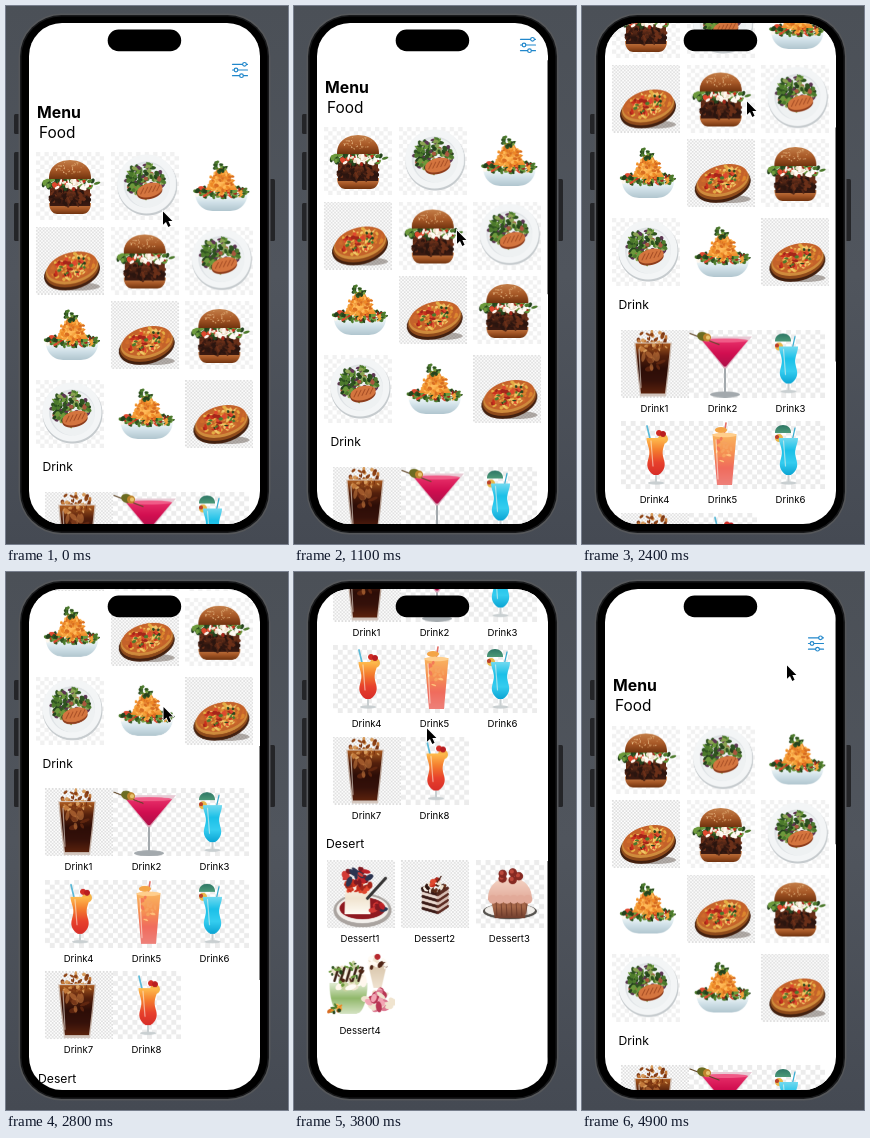
Animation of 282 by 538 pixels, one loop 5 s. Source, as an HTML page with a canvas:

```html
<!DOCTYPE html>
<html lang="en">
<head>
<meta charset="utf-8">
<title>Menu</title>
<style>
html, body { margin: 0; width: 100%; height: 100%; overflow: hidden; background: #4a4f57; }
canvas { display: block; width: 282px; height: 538px; }
</style>
</head>
<body>
<canvas id="stage"></canvas>
<script>
const W = 282, H = 538, LOOP = 5000, STEP = 100, TILE = 68, DETAIL = 2;
const stage = document.getElementById('stage');
const dpr = window.devicePixelRatio || 1;
stage.width = W * dpr;
stage.height = H * dpr;
const screenCtx = stage.getContext('2d');
let g = screenCtx;

// ---- drawing helpers ----
function line(color, width, x0, y0, x1, y1) {
  g.strokeStyle = color; g.lineWidth = width; g.lineCap = 'round';
  g.beginPath(); g.moveTo(x0, y0); g.lineTo(x1, y1); g.stroke();
}
function oval(color, x, y, rx, ry = rx, turn = 0) {
  g.fillStyle = color; g.beginPath(); g.ellipse(x, y, rx, ry, turn, 0, 7); g.fill();
}
function box(color, x, y, w, h, r = 0) {
  g.fillStyle = color; g.beginPath(); g.roundRect(x, y, w, h, r); g.fill();
}
function fade(y0, y1, colors) {
  const grad = g.createLinearGradient(0, y0, 0, y1);
  colors.forEach((c, i) => grad.addColorStop(i / Math.max(1, colors.length - 1), c));
  return grad;
}

// A solid turned on a lathe: half(u) is its half width, u runs from top to bottom.
function turned(colors, x, y0, y1, half) {
  const n = 24;
  g.fillStyle = fade(y0, y1, colors);
  g.beginPath();
  for (let i = 0; i <= 2 * n + 1; i++) {
    const right = i <= n, u = (right ? i : 2 * n + 1 - i) / n;
    g.lineTo(x + (right ? 1 : -1) * half(u), y0 + (y1 - y0) * u);
  }
  g.fill();
}
const taper = (top, bottom) => u => top + (bottom - top) * u;
const dome = w => u => w * Math.sqrt(1 - (1 - u) ** 2.4);
const cup = (w, foot) => u => foot + (w - foot) * Math.sqrt(1 - u * u);
const tulip = w => u => w * (0.85 + 0.15 * Math.cos(u * 8)) * Math.sqrt(1 - 0.92 * u ** 6);

let seed = 1;
const random = () => (seed = (seed * 16807) % 2147483647) / 2147483647;
function scatter(n, x, y, rx, ry, size, colors) {
  for (let i = 0; i < n; i++) {
    const a = random() * 6.28, d = Math.sqrt(random());
    oval(colors[Math.floor(random() * colors.length)], x + Math.cos(a) * d * rx, y + Math.sin(a) * d * ry,
      size * (0.6 + random() * 0.6), size * (0.3 + random() * 0.5), random() * 3);
  }
}
function checks(size, color) {
  g.fillStyle = color;
  for (let y = 0; y * size < TILE; y++)
    for (let x = y % 2; x * size < TILE; x += 2) g.fillRect(x * size, y * size, size, size);
}
const coarse = () => checks(4.86, '#ececec');
const medium = () => checks(4.25, '#f1f1f1');
const fine = () => checks(1.7, '#dedede');

// ---- pictures, each in a 68 x 68 tile ----
const GREEN = ['#2f5420', '#4c7a2c', '#24421c', '#6d9a3c'];
const RED = ['#c92f1d', '#a5251a', '#df482e'];
const AMBER = ['#c1783a', '#8f4416', '#d69b5c', '#7b3512'];
const CARROT = ['#f5a13b', '#d76c21', '#ffba58', '#ee8826'];
const CREAM = ['#fff7ed', '#f0e4cf', '#fffbf4'];
const MEAT = ['#512616', '#6b3019', '#2b150f', '#3d1b12'];
const BERRY = ['#bc2027', '#801921', '#d33a35', '#2b3450'];
const BUN = ['#c47f49', '#a95a28', '#70330f'];

const gloss = (x, y0, y1) => line('rgba(255,245,235,.55)', 1.2, x, y0, x + 2, y1);
function stem(color, x, y0, y1, foot) {
  oval(color, x, y1, foot, foot / 5);
  line(color, 2, x, y0, x, y1);
}
function tulipDrink(colors, x) {
  stem('#c9cfd1', x, 50, 62, 8);
  turned(colors, x, 17, 54, tulip(9.5));
  gloss(x - 5, 20, 45);
}

const pictures = {
  burger() {
    medium();
    turned(BUN, 34, 51, 62, cup(21, 13));
    turned(MEAT, 34, 34, 54, () => 20);
    scatter(80, 34, 45, 21, 8, 2.6, MEAT);
    scatter(90, 34, 31, 28, 6, 3, GREEN);
    scatter(14, 34, 32, 20, 5, 3, RED);
    scatter(24, 35, 33, 17, 5, 2.8, CREAM);
    turned(BUN, 34, 8, 27, dome(21));
    scatter(40, 34, 16, 15, 6, 0.8, ['#e6b987', '#d69d66']);
  },
  salmon() {
    medium();
    oval('#c6cbce', 36.5, 33.5, 30);
    oval('#f3f5f6', 36, 32, 29.5);
    oval('#dfe3e6', 36, 32.5, 23);
    oval('#eef1f2', 37, 33.5, 22);
    scatter(150, 34, 29, 19, 17, 3, [...GREEN, ...GREEN, '#8aa352', '#5c3552', '#a9573f']);
    oval('#8d3c1b', 39, 40, 13, 7, -0.25);
    oval('#d4753f', 39, 38, 13, 7, -0.25);
    for (let x = 30; x < 49; x += 4) line('#a74f26', 1, x, 42 - (x - 30) / 5, x + 3, 36 - (x - 30) / 5);
  },
  bowl() {
    turned(['#f4fafb', '#cfe0e7', '#b1c6cf'], 36, 42, 59, cup(26, 9));
    scatter(110, 36, 40, 27, 6, 2.8, [...GREEN, ...GREEN, ...RED, CARROT[0], CREAM[0]]);
    turned(CARROT, 36, 16, 38, taper(4, 16));
    scatter(100, 36, 30, 13, 12, 2, CARROT);
    scatter(20, 35, 14, 6, 6, 2.2, GREEN);
  },
  pizza() {
    fine();
    oval('rgba(70,55,45,.4)', 42, 60, 22, 4);
    ['#43200f', '#8f4a1b', '#cf8b3c', '#c4622a'].forEach((color, i) =>
      oval(color, 36, 46 - i * 2, 28.5 - i, 17 - i, -0.25));
    g.save();
    g.translate(36, 40);
    g.rotate(-0.25);
    scatter(110, 0, 0, 23, 12, 2.2, ['#e5ae45', '#f1c869', '#cf6a2b', '#dc862e']);
    scatter(22, 0, 0, 20, 10, 2.8, RED);
    scatter(14, 0, 0, 19, 9, 2, GREEN);
    g.restore();
  },
  cola() {
    fine();
    scatter(34, 31, 11, 18, 9, 2.4, AMBER);
    turned(['#d8cbc1', '#b39c8f', '#d5c9c1'], 32, 13, 67, taper(19, 13));
    turned(['#a9591f', '#54200c', '#2c0d07', '#35110a', '#5b220d'], 32, 14, 64, taper(17.5, 12));
    scatter(12, 32, 30, 11, 13, 4.5, ['rgba(214,134,70,.5)', 'rgba(110,45,18,.7)']);
    scatter(26, 32, 18, 15, 4, 2, AMBER);
    gloss(18, 20, 58);
  },
  cocktail() {
    coarse();
    stem('#a3a9ad', 36, 38, 65, 15);
    turned(['#e8ccd6', '#d9a5b8'], 36, 7, 39, taper(27, 1));
    turned(['#e72f69', '#d10e50', '#ae1049'], 36, 11, 37, taper(23, 1));
    oval('#f05b87', 36, 11, 23, 2);
    line('#604628', 1.2, 1, 4, 30, 15);
    oval('#6c6c22', 14, 7, 6, 4.5, 0.3);
    oval('#bf842c', 18, 8, 4);
    oval('#e7c470', 19, 8, 2);
  },
  blue() {
    coarse();
    line('#37acd1', 1.2, 38, 7, 34, 25);
    oval('#e9b84a', 22, 17, 4);
    oval('#bc402b', 20, 16, 2);
    turned(['#2e7665', '#4c9a78'], 26, 4, 12, dome(8));
    tulipDrink(['#72daf0', '#1bc0e8', '#35cdf0', '#0ba4d3'], 31.5);
  },
  sunrise() {
    coarse();
    line('#5ab9d7', 1.7, 26, 5, 32, 30);
    oval('#f6b348', 42, 18, 5);
    oval('#d12b24', 38, 12, 3);
    oval('#b91d20', 42, 13, 3);
    tulipDrink(['#ffbd4e', '#f47c2e', '#e7402c', '#d72d28'], 35);
  },
  peach() {
    coarse();
    line('#e46d65', 1.6, 37, 2, 34, 21);
    oval('#f4a547', 32, 9, 6, 3);
    turned(['#f9b562', '#f69452', '#f06c5d', '#ee817a'], 35.5, 13, 64, taper(12, 7.5));
    oval('#ffce8c', 35.5, 14, 12, 2.3);
    scatter(18, 35, 28, 8, 13, 2.5, ['#ffc07a', '#f6a25f', '#f47a56']);
    gloss(27, 19, 58);
  },
  pudding() {
    fine();
    ['#aaa4a0', '#f3f0ec', '#8f1920'].forEach((color, i) => oval(color, 36, 50 - i, 29 - i * 3, 17 - i * 3));
    turned(CREAM, 31, 22, 54, taper(12, 13));
    scatter(26, 31, 26, 14, 6, 3.5, RED);
    line('#353333', 3, 41, 38, 59, 18);
    scatter(18, 31, 15, 13, 9, 4.5, BERRY);
    scatter(10, 49, 48, 9, 6, 4, BERRY);
  },
  slice() {
    fine();
    for (let i = 0; i < 7; i++) {
      line(i % 2 ? '#ead8cf' : '#3b1b17', 3.4, 22, 48 - i * 3, 36, 52 - i * 3);
      line(i % 2 ? '#d8bfb5' : '#5c2b22', 3.4, 37, 52 - i * 3, 46, 46 - i * 3);
    }
    scatter(26, 34, 27, 12, 5, 2.5, [...CREAM, ...MEAT]);
    scatter(8, 33, 22, 5, 4, 3, RED);
    line('#4a271b', 1.2, 36, 22, 40, 16);
  },
  cake() {
    coarse();
    oval('#54514d', 34, 51, 27, 8);
    oval('#f2efeb', 34, 50, 25, 6.5);
    turned(['#875038', '#a9694a', '#6e3c2c'], 34, 34, 58, taper(20, 15));
    for (let x = 20; x < 51; x += 5) line('rgba(82,39,27,.55)', 1, x, 40, x + 1, 55);
    turned(['#f4d4c5', '#e2aa99'], 34, 17, 40, dome(22));
    for (let x = 17; x < 56; x += 7) oval('#e2aa99', x, 39, 4.5);
    for (let i = 0; i < 5; i++) {
      oval('#852921', 34 + 9 * Math.cos(i * 1.26), 16 + 4 * Math.sin(i * 1.26), 4.2);
      oval('#bd493b', 33 + 9 * Math.cos(i * 1.26), 15 + 4 * Math.sin(i * 1.26), 2);
    }
  },
  sundae() {
    turned(['#e2ecd4', '#91b86b', '#d4e2c2'], 22, 31, 62, cup(19, 8));
    scatter(34, 22, 24, 18, 12, 5, [...CREAM, '#c9d3a0']);
    for (let x = 8; x < 38; x += 6) line('#3e2418', 2.4, x, 29, x + 4, 16);
    scatter(22, 20, 22, 17, 12, 2.4, [...GREEN, MEAT[0]]);
    turned(['#dac7ad', '#efe2d0'], 51, 14, 36, taper(9, 4));
    scatter(16, 51, 11, 9, 7, 3.5, [...CREAM, MEAT[0]]);
    oval('#b6282e', 51, 5, 3);
    scatter(30, 52, 49, 14, 10, 5, ['#dc7890', '#b83553', '#f2a6b4', CREAM[1]]);
    scatter(14, 9, 57, 8, 4, 2.4, [...CARROT, ...GREEN]);
  }
};

const tiles = {};
for (const name in pictures) {
  const tile = tiles[name] = document.createElement('canvas');
  tile.width = tile.height = TILE * DETAIL * dpr;
  g = tile.getContext('2d');
  g.scale(DETAIL * dpr, DETAIL * dpr);
  box('#fff', 0, 0, TILE, TILE);
  pictures[name]();
}
g = screenCtx;
g.imageSmoothingQuality = 'high';

// ---- page content ----
const FOOD = ['burger', 'salmon', 'bowl', 'pizza'];
const DRINKS = ['cola', 'cocktail', 'blue', 'sunrise', 'peach', 'blue', 'cola', 'sunrise'];
const DESSERTS = ['pudding', 'slice', 'cake', 'sundae'];

function text(str, x, y, size, weight = 400, align = 'left') {
  g.font = `${weight} ${size}px Inter, Roboto, sans-serif`;
  g.textAlign = align;
  g.fillStyle = '#000';
  g.fillText(str, x, y);
}
function grid(names, left, top, pitchX, pitchY, label) {
  names.forEach((name, i) => {
    const x = left + (i % 3) * pitchX, y = top + Math.floor(i / 3) * pitchY;
    g.drawImage(tiles[name], x, y, TILE, TILE);
    if (label) text(label + (i + 1), x + 33.5, y + 82, 9.6, 400, 'center');
  });
}
function filterIcon(x, y) {
  for (let i = -1; i <= 1; i++) {
    const lineY = y + i * 5.7, knobX = x + (i ? 3 - i * 1.5 : -4);
    line('#2187cb', 1.2, x - 7.5, lineY, x + 7.5, lineY);
    oval('#2187cb', knobX, lineY, 2.4);
    oval('#fff', knobX, lineY, 1.2);
  }
}
function page() {
  filterIcon(234, 64);
  text('Menu', 31, 111.5, 15.8, 700);
  text('Food', 33, 131.5, 15.4);
  const foods = Array.from({ length: 12 }, (_, i) => FOOD[i % 4]);
  grid(foods.slice(0, 9), 30, 146, 74.7, 74.5);
  grid(foods.slice(9), 30, 374, 74.7, 0);
  text('Drink', 36.5, 465, 12.2);
  grid(DRINKS, 39, 485.5, 68, 91.5, 'Drink');
  text('Desert', 32, 780.3, 12.2);
  grid(DESSERTS, 32.5, 792.3, 74.7, 91.5, 'Dessert');
}

function phone() {
  box(fade(0, H, ['#4b5057', '#50555d', '#454a53']), 0, 0, W, H);
  box('#242528', 8, 108, 6, 20, 1.5);
  box('#242528', 8, 146, 6, 38, 1.5);
  box('#242528', 8, 197, 6, 38, 1.5);
  box('#242528', 263, 173, 6, 62, 1.5);
  ['#55575a', '#18191b', '#000'].forEach((color, i) =>
    box(color, 12.5 + i * 1.5, 7.5 + i * 1.5, 252 - i * 3, 521 - i * 3, 43 - i * 1.5));
}

function cursor(x, y) {
  const arrow = new Path2D('M0 0V15L3.4 11.8 6 17.5 8.6 16.3 6.1 10.8H10.7Z');
  g.save();
  g.translate(x, y);
  g.scale(0.88, 0.88);
  g.strokeStyle = '#fff';
  g.lineWidth = 1.8;
  g.stroke(arrow);
  g.fillStyle = '#000';
  g.fill(arrow);
  g.restore();
}

// ---- motion: each swipe eases from one rest to the next ----
const RESTS = [
  { t: 0, scroll: 0, x: 157, y: 205.5 },
  { t: 1100, scroll: 25, x: 163, y: 224.5 },
  { t: 2400, scroll: 162, x: 165, y: 95.5 },
  { t: 3200, scroll: 376.5, x: 150, y: 174.5 },
  { t: 3800, scroll: 504, x: 133, y: 156.5 },
  { t: 4400, scroll: 146, x: 138, y: 430.5 },
  { t: 4900, scroll: -7.5, x: 205, y: 93.5 }
];
function poseAt(t) {
  const next = Math.max(1, RESTS.findIndex(rest => rest.t >= t));
  const a = RESTS[next - 1], b = RESTS[next];
  const u = (t - a.t) / (b.t - a.t), eased = u * u * (3 - 2 * u);
  const mix = key => a[key] + (b[key] - a[key]) * eased;
  return { scroll: mix('scroll'), x: mix('x'), y: mix('y') };
}

function draw(t) {
  const { scroll, x, y } = poseAt(t);
  g.setTransform(dpr, 0, 0, dpr, 0, 0);
  phone();
  g.save();
  g.beginPath();
  g.roundRect(23, 17, 231, 501, 33);
  g.clip();
  box('#fff', 23, 17, 231, 501);
  g.translate(0, -scroll);
  page();
  g.translate(0, scroll);
  if (t > 0) box('#8a8a8a', 253, 42 + scroll * 0.49, 1, 234);
  g.restore();
  box('#000', 101.7, 23.6, 73.5, 21.6, 10.8);
  cursor(x, y);
}

let shown = -1;
function tick() {
  const t = Math.floor(performance.now() % LOOP / STEP) * STEP;
  if (t !== shown) draw(shown = t);
  requestAnimationFrame(tick);
}
tick();
</script>
</body>
</html>
```
